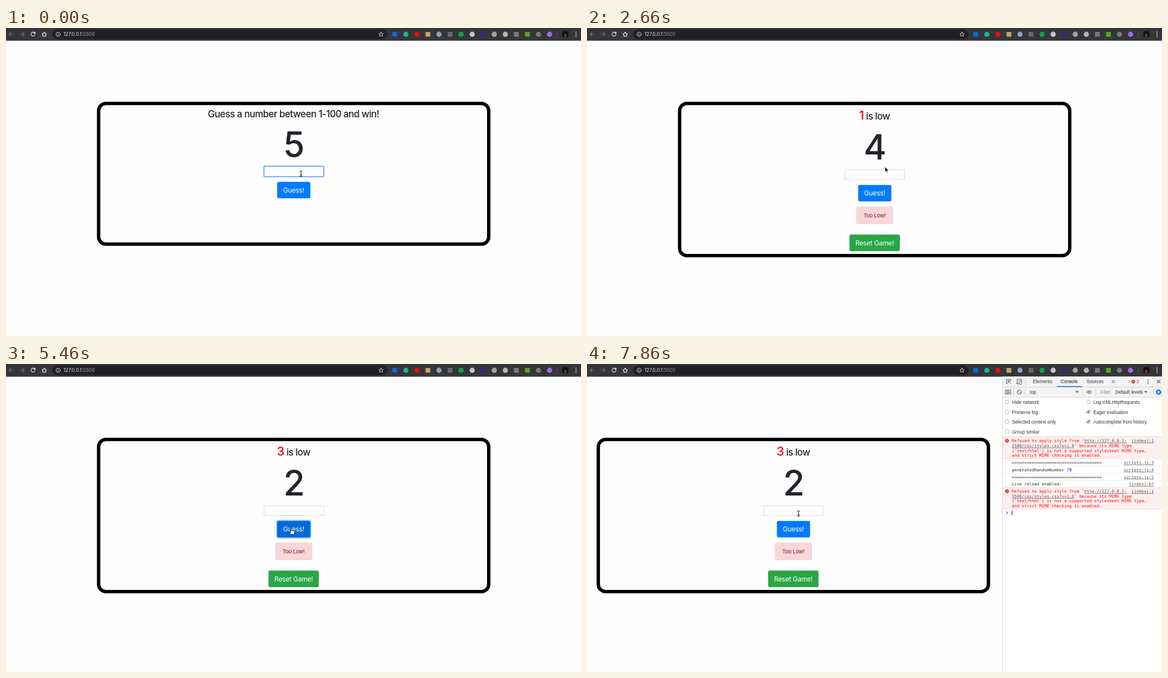
Write an HTML page that moves like this. It is 1022x548 px and loops after 8000 ms.

```html
<!DOCTYPE html>
<html lang="en">
<head>
<meta charset="utf-8">
<title>Guess a number</title>
<style>
  html, body { margin: 0; width: 100%; height: 100%; overflow: hidden; background: #fefefe; }
  svg { display: block; width: 100vw; height: 100vh; }
  text { white-space: pre; }
  .ui { font-family: Inter, sans-serif; text-anchor: middle; letter-spacing: -.025em; }
  .head { font-weight: 500; font-size: 16.8px; letter-spacing: -.0335em; fill: #212529; }
  .btn { font-size: 12px; fill: #fff; }
  .tool { font: 8.2px "Liberation Sans", Arial, sans-serif; fill: #333; }
  .mono { font: 7.39px "DejaVu Sans Mono", monospace; fill: #303030; }
  .err { fill: #f00; }
  .link { fill: #545454; text-decoration: underline; }
  .line { fill: none; stroke-linecap: round; stroke-linejoin: round; }
</style>
</head>
<body>
<svg viewBox="0 0 1022 548" preserveAspectRatio="none">
  <rect width="1022" height="548" fill="#fefefe"/>

  <g id="page">
    <rect id="frame" x="164.6" y="134.2" width="693.4" height="250.4" rx="13" fill="none" stroke="#000" stroke-width="6"/>
    <text id="title" class="ui head" x="511"><tspan id="last" fill="#f00" font-size="22"></tspan><tspan id="msg"></tspan></text>
    <g id="form">
      <text id="left" class="ui" x="511.3" y="234" font-size="62" font-weight="500" fill="#212529"></text>
      <rect id="field" fill="#fff"/>
      <text id="typed" x="460.3" y="264.4" font-family="Inter, sans-serif" font-size="9.2"></text>
      <rect id="ring" x="480.2" y="277.3" width="62.6" height="33.2" rx="4.5" fill="#93c7ff"/>
      <rect id="guess" x="482" y="279.2" width="59" height="29.4" rx="3"/>
      <text class="ui btn" x="511.2" y="298.3">Guess!</text>
    </g>
    <g id="result">
      <rect x="479" y="318.3" width="64.8" height="30.2" rx="2.4" fill="#f8d7da" stroke="#f5c6cb" stroke-width=".7"/>
      <text class="ui" x="511.2" y="337.1" font-size="9.6" fill="#721c24">Too Low!</text>
      <rect x="466.5" y="367.6" width="89.5" height="29.4" rx="3" fill="#28a745"/>
      <text class="ui btn" x="511.2" y="386.7">Reset Game!</text>
    </g>
  </g>

  <g id="bar">
    <rect width="1022" height="22.6" fill="#35363a"/>
    <rect x="82" y="2.6" width="596" height="17.2" rx="8.6" fill="#202124"/>
    <g class="line" stroke="#74777b" stroke-width="1.1">
      <path d="M13 11H6M9 7.5L5.6 11L9 14.5"/>
      <path d="M25 11H32M29 7.5L32.4 11L29 14.5"/>
    </g>
    <g class="line" stroke="#e8eaed" stroke-width="1.1">
      <path d="M51.2 9A3.6 3.6 0 1 0 51.6 12M51.8 7V9.6H49.2"/>
      <path d="M64.2 11L68 7.3L71.8 11M65.4 10.4V14.6H70.6V10.4"/>
      <circle cx="92.6" cy="11.2" r="3.7" stroke-width=".9"/>
      <path d="M92.6 11V13M92.6 9.3V9.4" stroke-width=".9"/>
      <path id="star" stroke-width=".8"/>
    </g>
    <text x="102" y="14.2" font-family="Inter, sans-serif" font-size="8.5" fill="#e8eaed">127.0.0.1<tspan fill="#9aa0a6">:5500</tspan></text>
    <g id="icons"></g>
    <rect x="979.3" y="6" width=".8" height="10" fill="#5f6368"/>
    <rect x="988.6" y="5.6" width="11" height="11" rx="2" fill="#141214"/>
    <path d="M992 16.6V11.8Q994 9.5 996 11.8V16.6Z" fill="#62443f"/>
    <g fill="#e8eaed"><circle cx="1013.2" cy="7.4" r="1"/><circle cx="1013.2" cy="11" r="1"/><circle cx="1013.2" cy="14.6" r="1"/></g>
  </g>

  <g id="panel">
    <rect x="738" y="22.6" width="284" height="526" fill="#fff"/>
    <rect x="738" y="22.6" width="284" height="36.6" fill="#f3f3f3"/>
    <path d="M738.4 22.6V548M738 41H1022M738 59.2H1022M738 129.3H1022M779.5 26V38M758.5 44V56M778.5 44V56M880.5 44V56M904 44V56M1007.5 44V56" stroke="#ccc" stroke-width=".8"/>
    <rect x="835" y="39.4" width="45" height="1.6" fill="#1a73e8"/>
    <g class="line" stroke="#5a5a5a" stroke-width="1">
      <path d="M747.5 34.5H745.5V27.5H753V29.5M748.5 30L753.8 35.2M748.5 30V34M748.5 30H752.5"/>
      <path d="M764.5 35V27H772.5V29M763 35H767M768.5 30H772.5V36H768.5Z"/>
      <path d="M933 28.8L935 31.2L933 33.6M936 28.8L938 31.2L936 33.6"/>
      <path d="M1013.5 28.5L1018.8 33.8M1018.8 28.5L1013.5 33.8" stroke-width="1.3"/>
      <path d="M744 46.5H753.4V53.3H744ZM746.6 46.5V53.3M749 48.4L751.3 50L749 51.6Z"/>
      <circle cx="768.4" cy="50" r="3.7"/><path d="M765.9 47.4L770.9 52.6"/>
      <path d="M887.7 50Q892.3 44.5 897 50Q892.3 55.5 887.7 50Z"/><circle cx="892.3" cy="50" r="1.2"/>
    </g>
    <g fill="#5a5a5a"><circle cx="997.3" cy="28" r="1"/><circle cx="997.3" cy="31.4" r="1"/><circle cx="997.3" cy="34.8" r="1"/>
      <path d="M868.6 47.9H873.6L871.1 52Z"/><path d="M990.6 47.9H995.6L993.1 52Z"/></g>
    <circle cx="1016" cy="50" r="3" fill="none" stroke="#1a73e8" stroke-width="2.2"/>
    <circle cx="1016" cy="50" r="4.4" fill="none" stroke="#1a73e8" stroke-width="1.4" stroke-dasharray="1.73"/>
    <g id="console"></g>
    <path class="line" d="M745.4 262.8L747.7 265L745.4 267.2" stroke="#367cf1" stroke-width="1.2"/>
    <rect id="caret" x="755" y="260.8" width=".9" height="8.2" fill="#000"/>
  </g>

  <g id="cursor">
    <path id="arrow" d="M0 0V9.2L2.1 7.3L3.6 10.6L5.2 9.9L3.8 6.7H6.7Z" fill="#000" stroke="#fff" stroke-width=".8"/>
    <path id="beam" class="line" d="M-2 -4.8Q0 -4.8 0 -3.4Q0 -4.8 2 -4.8M0 -3.4V3.6M-2 5Q0 5 0 3.6Q0 5 2 5M-1.1 1.6H1.1" stroke="#111" stroke-width="1"/>
    <path id="hand" class="line" d="M-1.2 7V1A1 1 0 0 1 .8 1V4.2Q1.8 3.4 2.6 4.5Q3.6 3.8 4.3 4.9Q5.6 4.6 5.6 6V8Q5.6 9 4.6 10.8H-.6L-3.3 7.4Q-3.6 6 -2.4 6.1Z" style="fill:#fff" stroke="#111" stroke-width=".9"/>
  </g>
</svg>
<script>
const LOOP = 8000;
const NS = 'http://www.w3.org/2000/svg';
const $ = id => document.getElementById(id);

function set(el, attrs) {
  for (const key in attrs) el.setAttribute(key, attrs[key]);
  return el;
}
function add(parent, tag, attrs, text = '') {
  const el = set(document.createElementNS(NS, tag), attrs);
  el.textContent = text;
  parent.appendChild(el);
  return el;
}
const show = (id, on) => $(id).style.display = on ? '' : 'none';

// Toolbar
const star = Array.from({ length: 10 }, (_, i) => {
  const r = i % 2 ? 1.9 : 4.2, a = i * Math.PI / 5;
  return (666.6 + r * Math.sin(a)).toFixed(2) + ' ' + (11.4 - r * Math.cos(a)).toFixed(2);
});
set($('star'), { d: 'M' + star.join('L') + 'Z' });

const icons = ['s#1266d6', 'c#11b981', 'c#d9140c', 's#c5a26c', 'c#8ba3b8', 's#66696c', 'c#10a34a', 'c#c3c6ca',
  's#40217c', 'c#a2a4a7', 'c#b4b6b8', 's#77797c', 's#55a810', 'c#77797c', 'c#a06bea'];
icons.forEach((icon, i) => {
  const x = 691 + i * 19.65, fill = icon.slice(1);
  if (icon[0] === 'c') add($('icons'), 'circle', { cx: x, cy: 11.2, r: 4.6, fill });
  else add($('icons'), 'rect', { x: x - 4.3, y: 7, width: 8.6, height: 8.6, rx: 1, fill });
});

// Developer tools
const box = $('console');
const tool = (x, y, text, fill = '#333') => add(box, 'text', { class: 'tool', x, y, style: 'fill:' + fill }, text);
const mono = (x, y, text, kind = '') => add(box, 'text', { class: 'mono ' + kind, x, y }, text);
const source = (y, text) => set(mono(1007.5, y, text, 'link'), { 'text-anchor': 'end' });
const rule = (y, stroke = '#ececec') => add(box, 'path', { d: `M739 ${y}H1022`, stroke, 'stroke-width': .8 });

function cross(x, y, r) {
  add(box, 'circle', { cx: x, cy: y, r, fill: '#dc2b2b' });
  add(box, 'path', { d: `M${x - 1.2} ${y - 1.2}l2.4 2.4m0 -2.4l-2.4 2.4`, stroke: '#fff', 'stroke-width': .8 });
}
function check(x, y, label, on) {
  add(box, 'rect', { x, y: y - 3.2, width: 6.2, height: 6.2, rx: 1.2, fill: '#fff', stroke: '#aaa', 'stroke-width': .8 });
  if (on) add(box, 'path', { class: 'line', d: `M${x + 1.3} ${y}l1.4 1.6l2.4 -3.8`, stroke: '#222', 'stroke-width': 1.1 });
  tool(x + 12, y + 3.4, label);
}
function error(y) {
  add(box, 'rect', { x: 739, y, width: 283, height: 38.6, fill: '#fff0f0' });
  rule(y, '#ffd6d6');
  rule(y + 38.6, '#ffd6d6');
  cross(746.5, y + 6.8, 3.3);
  const row = i => y + 9.5 + i * 8.6;
  const link = (el, text) => add(el, 'tspan', { class: 'link' }, text);
  link(mono(755, row(0), "Refused to apply style from '", 'err'), 'http://127.0.0.1:');
  const second = mono(755, row(1), '', 'err');
  link(second, '5500/css/styles.css?v=1.0');
  add(second, 'tspan', {}, "' because its MIME type");
  mono(755, row(2), "('text/html') is not a supported stylesheet MIME type,", 'err');
  mono(755, row(3), 'and strict MIME checking is enabled.', 'err');
  source(row(0), '(index):1');
}

tool(792.6, 34.2, 'Elements');
tool(842, 34.2, 'Console', '#111');
tool(888, 34.2, 'Sources');
cross(971, 31.2, 3.3);
tool(976.8, 34.2, '2', '#c22');
tool(787, 53, 'top');
tool(912.6, 53.2, 'Filter', '#8a8a8a');
tool(939, 53, 'Default levels');
['Hide network', 'Preserve log', 'Selected context only', 'Group similar']
  .forEach((label, i) => check(743.5, 67.6 + i * 17.5, label));
['Log XMLHttpRequests', 'Eager evaluation', 'Autocomplete from history']
  .forEach((label, i) => check(888, 67.6 + i * 17.5, label, i > 0));
error(129.8);
const bars = '='.repeat(36);
mono(755, 178, bars);
add(mono(755, 190.8, 'generatedRandomNumber '), 'tspan', { fill: '#1c00cf' }, '79');
mono(755, 203.6, bars);
mono(755, 216.2, 'Live reload enabled.');
['scripts.js:3', 'scripts.js:4', 'scripts.js:5', '(index):67'].forEach((s, i) => source(178 + i * 12.75, s));
[182, 194.7, 207.5].forEach(y => rule(y));
error(219.6);

// Timeline: [start, value...]; the last started entry holds
const pointer = [
  [0, 'beam', 524.2, 259.3], [600, 'beam', 521, 263], [740, 'arrow', 515, 270], [890, 'hand', 509, 282],
  [1040, 'hand', 504.5, 290.5], [1180, 'hand', 503.8, 291],
  [2070, 'beam', 522, 266], [2220, 'arrow', 529.6, 247], [2810, 'beam', 528, 256], [2960, 'beam', 525, 260],
  [3540, 'beam', 519, 266], [3690, 'hand', 509, 286], [3850, 'hand', 507, 294.3],
  [4290, 'hand', 512, 281], [4430, 'beam', 517, 263],
  [5030, 'beam', 515, 266], [5170, 'hand', 509, 284], [5310, 'hand', 507.3, 292.3],
  [6510, 'arrow', 507.6, 291.8], [7130, 'arrow', 496, 291], [7280, 'arrow', 462, 286], [7420, 'arrow', 422, 279],
  [7560, 'arrow', 399.5, 275], [7860, 'beam', 376, 266.2]
];
const turns = [[0, '', 5], [1330, '1', 4], [4140, '2', 3], [5460, '3', 2]];
const typing = [[0, ''], [450, '1'], [1330, ''], [3400, '2'], [4140, ''], [4880, '3'], [5460, '']];
const focus = [[0, 'field'], [1180, 'button'], [2660, ''], [3250, 'field'], [4140, 'button'],
  [4580, 'field'], [5310, 'button'], [6510, '']];
const hover = [[0, false], [890, true], [2070, false], [3690, true], [4430, false], [5170, true], [6660, false]];
const docked = 6510, painted = 6660;

const at = (track, t) => track.filter(step => step[0] <= t).pop().slice(1);

function draw(t) {
  const [number, left] = at(turns, t);
  const [focused] = at(focus, t);
  const [kind, x, y] = at(pointer, t);
  const played = number !== '';

  set($('page'), { transform: `translate(${t >= docked ? -144.5 : 0} 0)` });
  set($('frame'), { height: played ? 270.8 : 250.4 });
  set($('title'), { y: played ? 163.3 : 159 });
  $('last').textContent = number;
  $('msg').textContent = played ? ' is low' : 'Guess a number between 1-100 and win!';
  set($('form'), { transform: `translate(0 ${played ? 0 : -5.5})` });
  $('left').textContent = left;
  $('typed').textContent = at(typing, t)[0];
  set($('field'), focused === 'field'
    ? { x: 458.4, y: 251.4, width: 106.4, height: 18.6, rx: 1, stroke: '#76a7f5', 'stroke-width': 2 }
    : { x: 458.8, y: 252, width: 105.6, height: 17.4, rx: 0, stroke: '#d4d4d4', 'stroke-width': .9 });
  show('ring', focused === 'button');
  set($('guess'), { fill: at(hover, t)[0] ? '#0069d9' : '#007bff' });
  show('result', played);
  show('panel', t >= painted);
  show('caret', t < 7280 || t >= 7860);
  ['arrow', 'beam', 'hand'].forEach(id => show(id, id === kind));
  set($('cursor'), { transform: `translate(${x} ${y})` });
}

const start = performance.now();
function tick() {
  draw((performance.now() - start) % LOOP);
  requestAnimationFrame(tick);
}
tick();
</script>
</body>
</html>
```
